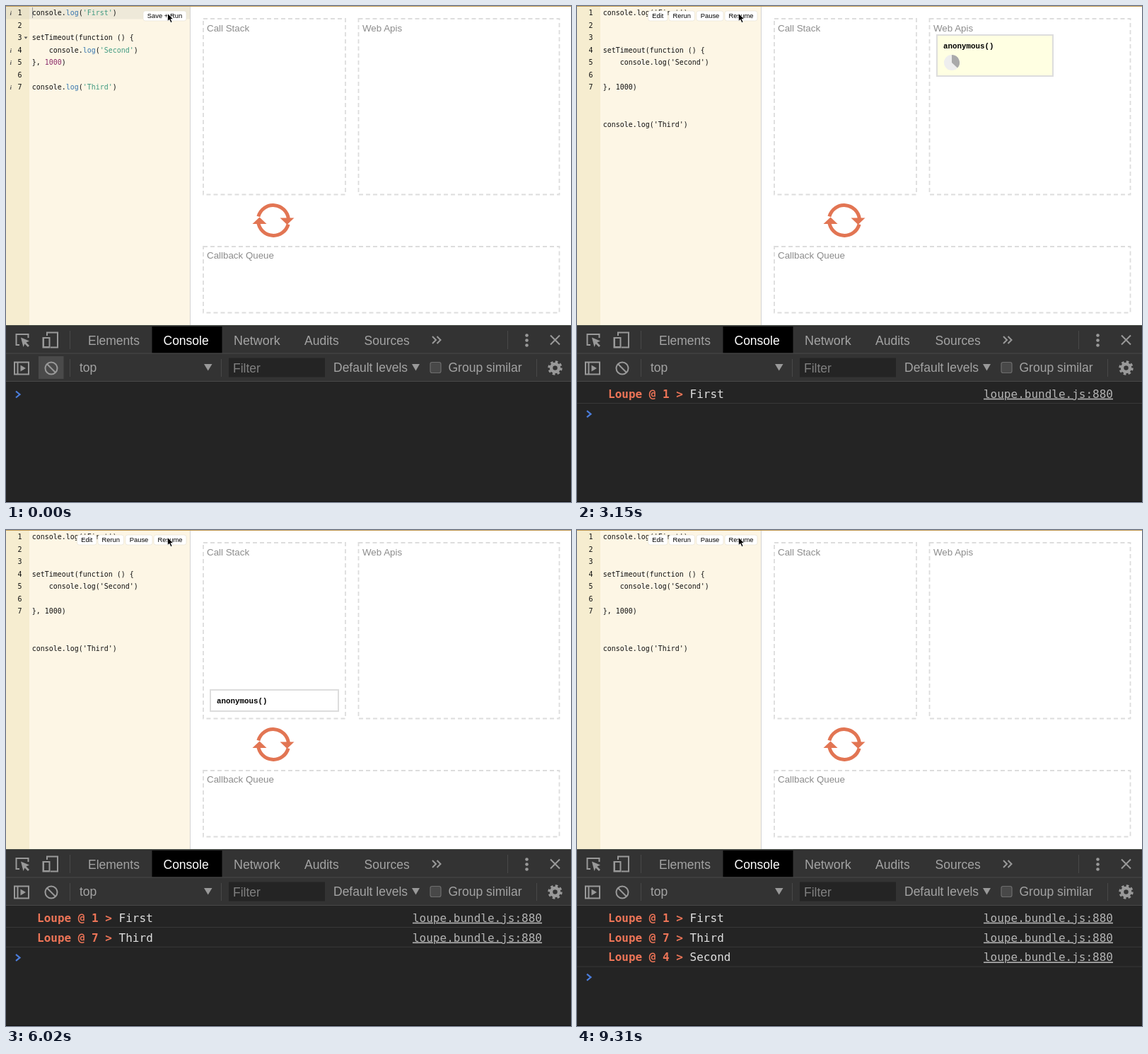
Animation of 799x701 px, one loop 9.38 s. Source, as an HTML page:

```html
<!DOCTYPE html>
<html lang="en">
<head>
<meta charset="utf-8">
<title>Event loop</title>
<style>
html, body { margin: 0; width: 100%; height: 100%; overflow: hidden; background: #fff; }
svg { display: block; width: 799px; height: 701px; }
text { white-space: pre; }
.code { font: 9.97px "DejaVu Sans Mono", monospace; fill: #111; }
.card text { font: bold 10.83px "Liberation Mono", monospace; fill: #000; }
.card rect { fill: #fff; stroke: #ddd; stroke-width: 2; }
.label { font: 13.35px "Liberation Sans", sans-serif; fill: #8c8c8c; }
.zone { fill: none; stroke: #ddd; stroke-width: 1.8; stroke-dasharray: 6 4; }
.btn rect { fill: #fff; stroke: #e4dfd0; stroke-width: .6; }
.btn text { font: 9.4px "Liberation Sans", sans-serif; text-anchor: middle; fill: #000; }
.ui { font: 17.5px "Liberation Sans", sans-serif; fill: #a3a3a3; }
.log { font: 16px "DejaVu Sans Mono", monospace; fill: #e0e0e0; }
.log .tag { font-weight: bold; fill: #ec7457; }
.log .link { fill: #b4b4b4; text-decoration: underline; }
.icon { fill: none; stroke: #999; stroke-width: 2; }
.fn { fill: #3b78b0; }
.str { fill: #3f9a80; }
.num { fill: #8c2c6a; }
.mark { fill: #f3d3c1; }
</style>
</head>
<body>
<svg viewBox="0 0 799 701">
  <rect width="799" height="452" fill="#fff"/>
  <rect width="261" height="452" fill="#fdf6e5"/>
  <rect width="33" height="452" fill="#f6edd0"/>
  <path d="M260.5 0V452" stroke="#d4d4d4"/>
  <g id="activeLine">
    <rect y="1" width="33" height="17.5" fill="#eae3c9"/>
    <rect x="33" y="1" width="227" height="17.5" fill="#eee9d9"/>
    <path d="M37.5 2V17" stroke="#999"/>
  </g>
  <g id="numbers" class="code" text-anchor="end"></g>
  <g id="editor" class="code"></g>
  <g id="runner" class="code"></g>
  <path d="M0 .5H799" stroke="#c29a52"/>
  <g id="saveBtn" class="btn"></g>
  <g id="runBtns" class="btn"></g>
  <path d="M228.5 10.5v11l2.5-2.2 2 4.3 2-1-2-4.1h3.4z" fill="#000" stroke="#fff" stroke-width=".7"/>

  <rect class="zone" x="279" y="18" width="201" height="248.5"/>
  <rect class="zone" x="498.5" y="18" width="284" height="248.5"/>
  <rect class="zone" x="279" y="340" width="503.5" height="93.5"/>
  <text class="label" x="284" y="36">Call Stack</text>
  <text class="label" x="504" y="36">Web Apis</text>
  <text class="label" x="284" y="357">Callback Queue</text>
  <g id="stack"></g>
  <g id="timer" class="card">
    <rect x="509" y="41" width="164" height="58"/>
    <text x="518" y="60">anonymous()</text>
    <circle cx="530" cy="80" r="11" fill="#eee"/>
    <path id="pie" fill="#aaa"/>
  </g>
  <g id="queued" class="card">
    <rect x="289" y="362.5" width="164" height="30"/>
    <text x="298" y="381.2">anonymous()</text>
  </g>
  <g id="loop">
    <path d="M356.9 297.5A21.7 21.7 0 0 1 399.4 301M399.1 308.5A21.7 21.7 0 0 1 356.6 305" fill="none" stroke="#e27553" stroke-width="5"/>
    <path d="M387.5 299.5H407.5L397.5 309zM348.5 308H368.5L358.5 298.5z" fill="#e27553"/>
  </g>

  <rect y="451" width="799" height="250" fill="#242424"/>
  <rect y="452" width="799" height="78" fill="#333"/>
  <rect x="206.5" y="453" width="99" height="37.5" fill="#000"/>
  <rect id="hover" x="46" y="495" width="35.5" height="32" fill="#4a4a4a"/>
  <path d="M0 451.5H799" stroke="#40463f"/>
  <path d="M0 491H799M0 530.5H799M90.5 459V485M709.5 459V485M90.5 499V524M304.5 499V524M750.5 499V524" stroke="#484848"/>
  <path d="M0 700.5H799" stroke="#111"/>
  <rect x="315" y="497.5" width="136" height="27" fill="#242424"/>
  <g class="ui">
    <text x="116" y="479">Elements</text>
    <text x="222.5" y="479" fill="#fff" style="fill:#fff">Console</text>
    <text x="322" y="479" style="font-size:17.9px">Network</text>
    <text x="422" y="479">Audits</text>
    <text x="506.5" y="479">Sources</text>
    <text x="104" y="517">top</text>
    <text x="321" y="518" style="fill:#808080">Filter</text>
    <text x="463" y="517">Default levels</text>
    <text x="625.5" y="517">Group similar</text>
  </g>
  <g class="icon">
    <path d="M19 479H14.5V464H31.500V469M53 468V482H61M58 466V461.500H73V482.500H63"/>
    <rect x="52.500" y="469" width="9" height="13.500"/>
    <path d="M603 467l5 5-5 5M609.500 467l5 5-5 5M770 465.500l13 13M783 465.500l-13 13"/>
    <rect x="12" y="503.500" width="20" height="17"/>
    <path d="M16.500 504V520"/>
    <circle cx="64" cy="512" r="8.500"/>
    <path d="M58 506l12 12"/>
    <circle cx="776.500" cy="511.500" r="5.500" stroke-width="4.500"/>
    <circle cx="776.500" cy="511.500" r="8.700" stroke-width="3" stroke-dasharray="3.600 3.233"/>
    <rect x="600" y="503.500" width="15" height="15" rx="2.500" fill="#484848" stroke="#6e6e6e" stroke-width="1.200"/>
  </g>
  <g fill="#999">
    <path d="M21 468.500L33 473.500 28.500 475.500 33 480 31 482 26.500 477.500 24.500 482z"/>
    <path d="M20.500 507.500V516.500L28 512z"/>
    <path d="M280 506H291.500L285.700 515.500zM574 506H585L579.500 515.500z"/>
    <circle cx="736.500" cy="465.500" r="2.300"/>
    <circle cx="736.500" cy="472.500" r="2.300"/>
    <circle cx="736.500" cy="479.500" r="2.300"/>
  </g>
  <g id="logs" class="log"></g>
  <path id="prompt" d="M14 544.500l5.500 4.500-5.500 4.500" fill="none" stroke="#4b7ddb" stroke-width="2.200"/>
</svg>
<script>
const LOOP = 9380, STEP = 70, FADE = 330, RUN = 350;
const $ = id => document.getElementById(id);
const clamp = v => Math.max(0, Math.min(1, v));
const show = (id, on) => { $(id).style.display = on ? '' : 'none'; };
const lineY = n => 13 + 17.5 * n;
const text = (x, y, s, attrs = '') => `<text x="${x}" y="${y}" ${attrs}>${s}</text>`;
const add = (id, html) => { $(id).innerHTML += html; };

// call stack: lines, bottom edge, pushed at, popped at, highlights [row, indent, length]
const calls = [
  [["console.log('First')"], 256, 530, 1260, [[0, 0, 20]]],
  [['setTimeout(function () {', "console.log('Second') },", '1000)'], 256, 2030, 2780,
    [[3, 0, 24], [4, 0, 25], [6, 0, 8]]],
  [["console.log('Third')"], 256, 3500, 4270, [[9, 0, 20]]],
  [['anonymous()'], 256, 5100, 8150, []],
  [["console.log('Second')"], 215.5, 6620, 7400, [[4, 4, 21]]]
];
// console rows: line number, message, time
const logs = [[1, 'First', 1260], [7, 'Third', 4270], [4, 'Second', 7400]];

for (let i = 0; i < 7; i++) add('numbers', text(22.5, lineY(i), i + 1));

const print = (arg, pad = '') =>
  `${pad}console.<tspan class="fn">log</tspan>(<tspan class="str">'${arg}'</tspan>)`;
[[0, print('First')], [2, 'setTimeout(function () {'], [3, print('Second', '    ')],
 [4, '}, <tspan class="num">1000</tspan>)'], [6, print('Third')]]
  .forEach(([row, s]) => add('editor', text(36.7, lineY(row), s)));
[0, 3, 4, 6].forEach(row => add('editor',
  text(5.5, lineY(row), 'i', 'style="font:italic bold 9px \'Liberation Serif\',serif;fill:#555"')));
add('editor', '<path d="M25.5 43.500h5l-2.500 3z" fill="#555"/>');

calls.forEach(([, , , , marks], i) => add('runner', `<g id="mark${i}">` + marks.map(([row, pad, len]) =>
  `<rect class="mark" x="${36.7 + pad * 6}" y="${lineY(row) - 10}" width="${len * 6}" height="13.500"/>`
).join('') + '</g>'));
[[0, "console.log('First')"], [3, 'setTimeout(function () {'], [4, "    console.log('Second')"],
 [6, '}, 1000)'], [9, "console.log('Third')"]]
  .forEach(([row, s]) => add('runner', text(36.7, lineY(row), s)));

const button = (id, x, w, s) => add(id,
  `<rect x="${x}" y="7" width="${w}" height="14" rx="3"/>` + text(x + w / 2, 17.3, s));
button('saveBtn', 194, 61, 'Save + Run');
button('runBtns', 100.5, 27.5, 'Edit');
button('runBtns', 130, 36.5, 'Rerun');
button('runBtns', 169, 38, 'Pause');
button('runBtns', 209, 46, 'Resume');

calls.forEach(([lines, bottom], i) => {
  const h = 17.5 + 12.5 * lines.length, top = bottom - h;
  add('stack', `<g id="call${i}" class="card"><rect x="289" y="${top}" width="181" height="${h}"/>` +
    lines.map((s, n) => text(298, top + 18.7 + 12.5 * n, s)).join('') + '</g>');
});

logs.forEach(([line, msg], i) => {
  const y = 553.7 + 27.8 * i;
  add('logs', `<g id="log${i}">` + text(44, y, `Loupe @ ${line} &gt;`, 'class="tag"') +
    text(159.6, y, msg) + text(758, y, 'loupe.bundle.js:880', 'class="link" text-anchor="end"') +
    `<path d="M0 ${y + 7.8}H799" stroke="#383838"/></g>`);
});

const flash = (id, age) => {
  const blue = Math.round(204 + 51 * clamp(age / 850));
  $(id).querySelector('rect').style.fill = `rgb(255,255,${blue})`;
};

function pie(p) {
  const a = 2 * Math.PI * Math.min(p, .999);
  const x = 530 + 11 * Math.sin(a), y = 80 - 11 * Math.cos(a);
  $('pie').setAttribute('d', `M530 80V69A11 11 0 ${p > .5 ? 1 : 0} 1 ${x} ${y}z`);
}

function draw(t) {
  const running = t >= RUN;
  ['activeLine', 'editor', 'saveBtn'].forEach(id => show(id, !running));
  ['runner', 'runBtns'].forEach(id => show(id, running));
  show('hover', t < 70);

  calls.forEach(([, , on, off], i) => {
    $('call' + i).style.opacity = clamp((t - on) / FADE) * clamp(1 - (t - off) / FADE);
    show('mark' + i, t >= on && t < off);
  });

  show('timer', t >= 2780 && t < 3800);
  flash('timer', t - 2780);
  pie(clamp((t - 2780) / 1000));
  show('queued', t >= 3800 && t < 5100);
  flash('queued', t - 3800);
  const spin = clamp((t - 5100) / 500);
  $('loop').setAttribute('transform', `rotate(${360 * spin * spin * (3 - 2 * spin)} 378 303)`);

  let rows = 0;
  logs.forEach(([, , at], i) => {
    show('log' + i, t >= at);
    if (t >= at) rows++;
  });
  $('prompt').setAttribute('transform', `translate(0 ${27.7 * rows})`);
}

const start = performance.now();
function tick() {
  const t = (performance.now() - start) % LOOP;
  draw(Math.floor(t / STEP) * STEP);
  requestAnimationFrame(tick);
}
tick();
</script>
</body>
</html>
```
